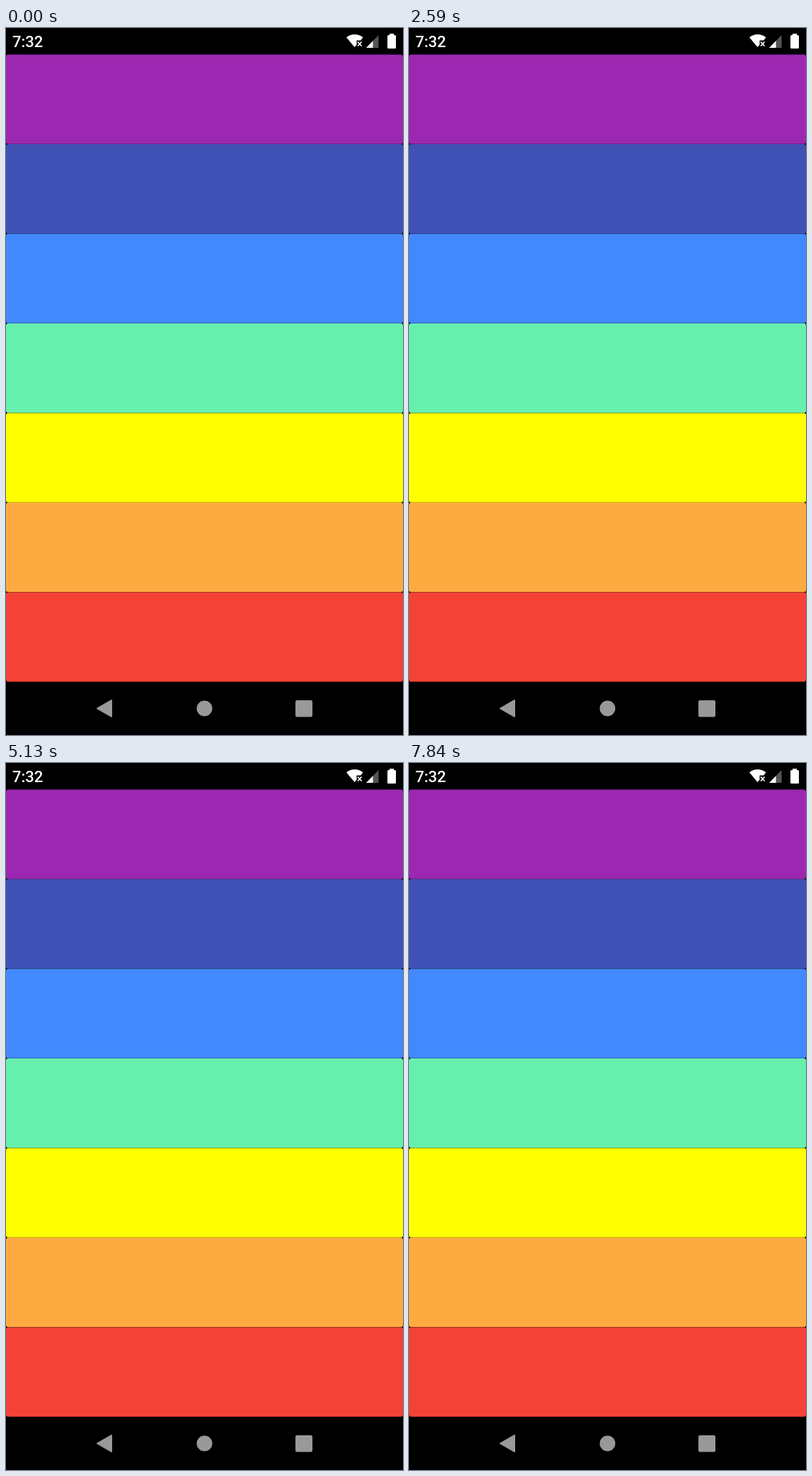
Write an HTML page without scripts that moves like this. It is 561 px wide and 998 px high and loops after 8000 ms.

```html
<!DOCTYPE html>
<html lang="en">
<head>
<meta charset="utf-8">
<title>Colour keys</title>
<style>
  html, body { margin: 0; width: 100%; height: 100%; overflow: hidden; background: #000; }
  svg { display: block; width: 100vw; height: 100vh; }
  .clock { font: 500 22px Roboto, sans-serif; fill: #fff; }
  .status { fill: #fff; }
  .nav { fill: #999; stroke: #999; stroke-width: 2; stroke-linejoin: round; }

  .highlight { opacity: 0; animation: highlight 8s linear infinite; }
  .splash { opacity: 0; animation: grow 8s linear infinite, fade 8s linear infinite; }

  @keyframes highlight {
    0%, 38.6% { opacity: 0; }
    41.1%, 41.625% { opacity: .16; }
    44.125%, 100% { opacity: 0; }
  }
  /* slow while held, fast after release, drifting to the key's centre */
  @keyframes grow {
    0%, 38.6% { transform: translate(301.6px, 215.5px) scale(0); }
    41.625% { transform: translate(296.5px, 218.4px) scale(.242); }
    43.79%, 100% { transform: translate(280.5px, 227.3px) scale(1); }
  }
  @keyframes fade {
    0%, 38.59% { opacity: 0; }
    38.6%, 41.625% { opacity: .12; }
    44.125%, 100% { opacity: 0; }
  }
</style>
</head>
<body>
<svg viewBox="0 0 561 998" preserveAspectRatio="none">
  <defs>
    <rect id="key" width="561" height="126.3" rx="3"/>
    <clipPath id="pressed"><use href="#key" y="164"/></clipPath>
  </defs>
  <rect width="561" height="998"/>

  <text class="clock" x="9" y="27">7:32</text>
  <g class="status">
    <path d="M492.5 27 481 13.2Q492.5 5 504.5 13.2L501 17.5H495.5V23.5Z"/>
    <path d="m497 19.5 5.5 6m0-6-5.5 6" stroke="#fff" stroke-width="1.8"/>
    <path d="M526.5 10V28H509Z" fill="#555"/>
    <path d="M518.5 18.2V28H509Z"/>
    <path d="M542 10V8h6v2h1.5q1.5 0 1.5 1.5v16q0 1.5-1.5 1.5h-9q-1.5 0-1.5-1.5v-16q0-1.5 1.5-1.5Z"/>
  </g>

  <use href="#key" y="37.5" fill="#9c27b0"/>
  <use href="#key" y="164" fill="#3f51b5"/>
  <use href="#key" y="290.5" fill="#4289ff"/>
  <use href="#key" y="417" fill="#67f0ad"/>
  <use href="#key" y="543.5" fill="#ff0"/>
  <use href="#key" y="670" fill="#fdaa40"/>
  <use href="#key" y="796.5" fill="#f44336"/>

  <g clip-path="url(#pressed)">
    <use class="highlight" href="#key" y="164"/>
    <circle class="splash" r="311"/>
  </g>

  <g class="nav">
    <path d="M129 960.5 149 949V972Z"/>
    <circle cx="280.5" cy="960.5" r="10"/>
    <rect x="410" y="950" width="22" height="21.5" rx="1"/>
  </g>
</svg>
</body>
</html>
```
